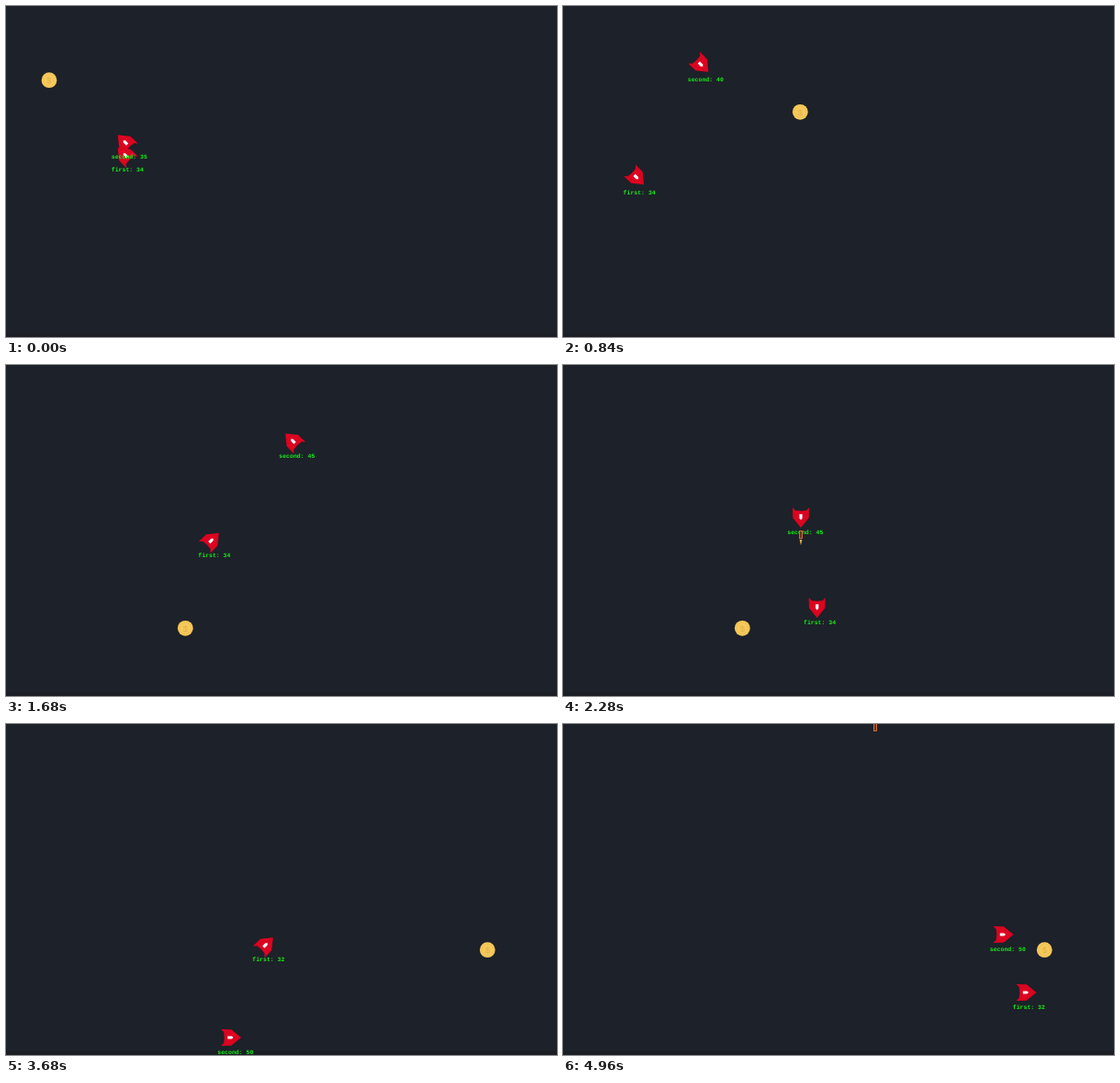
Write an HTML page that moves like this. It is 600 px wide and 360 px high and loops after 5000 ms.

```html
<!DOCTYPE html>
<html lang="en">
<head>
<meta charset="utf-8">
<title>Ships and coins</title>
<style>
  html, body { margin: 0; width: 100%; height: 100%; overflow: hidden; background: #1d2129; }
  svg { display: block; width: 600px; height: 360px; }
  .label { font: bold 6.5px "Liberation Mono", monospace; fill: #16ee16; white-space: pre; text-rendering: geometricPrecision; }
</style>
</head>
<body>
<svg viewBox="0 0 600 360">
  <defs>
    <g id="ship">
      <path d="M11 0 L.3 -8.7 L-11 -9 L-7.8 -6 L-7.2 0 L-7.8 6 L-11 9 L.3 8.7 Z" fill="#dc0420"/>
      <path d="M-3.7 -1.6 H.8 L2.6 0 L.8 1.6 H-3.7 Z" fill="#fff"/>
    </g>
    <g id="shot">
      <rect x="-7.5" y="-1.5" width="8" height="3" fill="#6b3216" stroke="#d9763a" stroke-width=".9"/>
      <path d="M2 -1.4 L8 0 L2 1.4 Z" fill="#f3b04c"/>
    </g>
  </defs>
  <rect width="600" height="360" fill="#1d2129"/>
  <rect y="356" width="600" height="4" fill="#1b1f25"/>
  <g id="coin">
    <circle r="8.4" fill="#f6c95c"/>
    <circle r="6.4" fill="none" stroke="#f0c052" stroke-width=".8"/>
    <text y="3.4" text-anchor="middle" font-family="Liberation Sans, sans-serif" font-size="9.5" fill="#e2b04a">$</text>
  </g>
  <g id="ships"></g>
  <g id="labels"></g>
  <g id="shots"></g>
</svg>
<script>
const LOOP = 5000, STEP = 40, HEIGHT = 360, SHOT_SPEED = 0.5;

// Key points [time, x, y]; route() finds the way between them.
const players = [
  {
    name: "second",
    score: t => 35 + 5 * coinIndex(t),
    keys: [
      [0, 129.5, 148], [440, 38, 57], [840, 150.5, 64], [1120, 209, 122], [1640, 320, 91],
      [1680, 312, 82.3], [2040, 223, 115], [2240, 259, 154], [2280, 259, 166],
      [2930, 135, 234], [3040, 139.5, 242.5], [3350, 207, 298], [3560, 218, 341],
      [3680, 245, 341], [3920, 302, 334], [4440, 340, 282], [4690, 393, 229], [4960, 479.5, 229]
    ]
  },
  {
    name: "first",
    score: t => t < 2440 ? 34 : 32,
    keys: [
      [0, 129.5, 162], [50, 119.5, 152], [440, 2, 152], [560, 27, 177], [840, 80.3, 186.5],
      [1280, 172, 276], [1680, 224, 190.5], [1970, 276.7, 190.5], [2280, 276.7, 264],
      [2460, 235, 282], [2760, 265, 235], [2940, 265, 282], [3040, 241.3, 282],
      [3140, 216, 257], [3680, 283, 240], [3920, 302, 186], [4080, 343, 174],
      [4850, 470, 292], [4960, 504.5, 292]
    ]
  }
];
const coins = [[0, 47, 80.7], [320, 258.3, 115.3], [1280, 195.3, 286.3], [3220, 524.3, 245.7]];
const shots = [
  { from: 2280, to: 2440, x: 259, y: 188, angle: 90 },
  { from: 4080, to: 4590, x: 358, y: 190, angle: 45 },
  { from: 4440, to: 5000, x: 340, y: 260, angle: -90 }
];

const $ = id => document.getElementById(id);
const coinIndex = t => coins.filter(c => c[0] <= t).length - 1;

function add(parent, name, attrs) {
  const el = document.createElementNS("http://www.w3.org/2000/svg", name);
  for (const key in attrs) el.setAttribute(key, attrs[key]);
  return parent.appendChild(el);
}

function place(el, x, y, angle = 0) {
  el.setAttribute("transform", `translate(${x} ${y}) rotate(${angle})`);
}

// Fly straight along the longer axis, then diagonally, at even speed.
function route(dx, dy, k) {
  const diag = Math.min(Math.abs(dx), Math.abs(dy));
  const sx = dx - Math.sign(dx) * diag, sy = dy - Math.sign(dy) * diag;
  const straight = Math.hypot(sx, sy), slant = diag * Math.SQRT2;
  const gone = k * (straight + slant);
  const a = straight ? Math.min(1, gone / straight) : 1;
  const b = slant ? Math.max(0, gone - straight) / slant : 0;
  // A leftover of a pixel or two is not worth a turn.
  const turned = b > 0 || straight < 3;
  const hx = turned ? dx - sx : sx, hy = turned ? dy - sy : sy;
  return {
    x: sx * a + (dx - sx) * b,
    y: sy * a + (dy - sy) * b,
    angle: Math.round(Math.atan2(hy, hx) / Math.PI * 4) * 45
  };
}

function poseAt(keys, t) {
  let i = 1;
  while (i < keys.length - 1 && t > keys[i][0]) i++;
  const [t0, x0, y0] = keys[i - 1], [t1, x1, y1] = keys[i];
  const leg = route(x1 - x0, y1 - y0, Math.min(1, (t - t0) / (t1 - t0)));
  return { x: x0 + leg.x, y: y0 + leg.y, angle: leg.angle };
}

for (const p of players) {
  p.ship = add($("ships"), "use", { href: "#ship" });
  p.label = add($("labels"), "text", { class: "label" });
}
for (const s of shots) s.el = add($("shots"), "use", { href: "#shot" });

function draw(t) {
  for (const p of players) {
    const { x, y, angle } = poseAt(p.keys, t);
    place(p.ship, x, y, angle);
    place(p.label, x - 14.7, y + 18.2);
    p.label.textContent = `${p.name}: ${p.score(t)}`;
  }
  const [, cx, cy] = coins[coinIndex(t)];
  place($("coin"), cx, cy);
  for (const s of shots) {
    const gone = (t - s.from) * SHOT_SPEED, a = s.angle * Math.PI / 180;
    const y = (s.y + Math.sin(a) * gone + HEIGHT) % HEIGHT;
    s.el.setAttribute("visibility", t >= s.from && t < s.to ? "visible" : "hidden");
    place(s.el, s.x + Math.cos(a) * gone, y, s.angle);
  }
}

const start = performance.now();
function tick() {
  const t = (performance.now() - start) % LOOP;
  draw(Math.floor(t / STEP) * STEP);
  requestAnimationFrame(tick);
}
draw(0);
requestAnimationFrame(tick);
</script>
</body>
</html>
```
